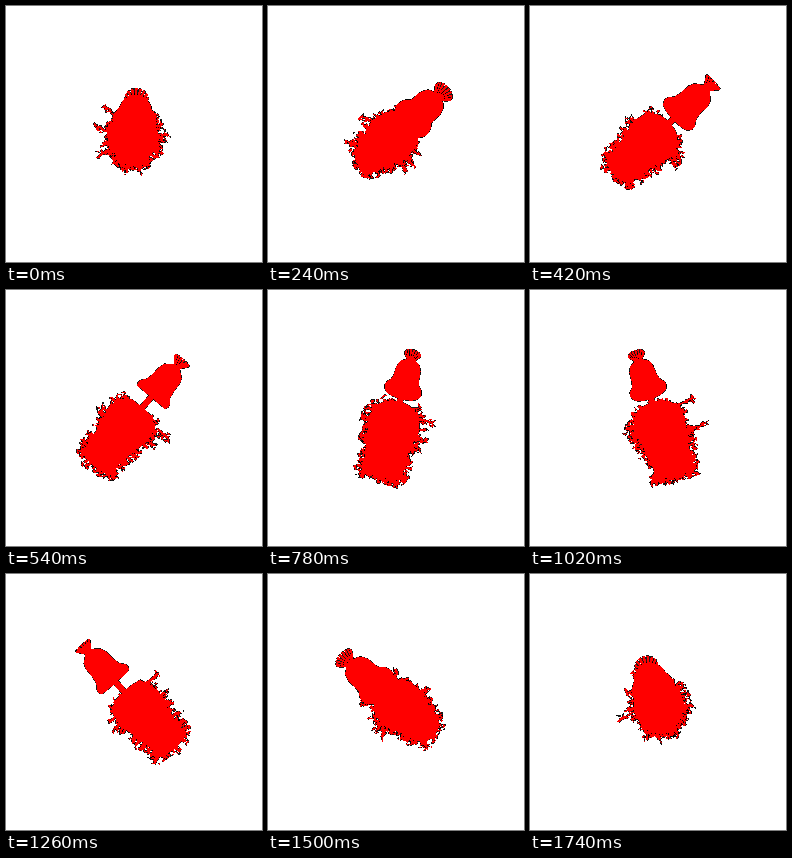
These frames come from a looping animation (256x256 px, 1800 ms). An HTML page:

```html
<!DOCTYPE html>
<html lang="en">
<head>
<meta charset="utf-8">
<title>Turning bell</title>
<style>
html, body { margin: 0; width: 100%; height: 100%; overflow: hidden; background: #fff; }
svg { display: block; width: 100vw; height: 100vh; }
</style>
</head>
<body>
<svg viewBox="0 0 256 256" shape-rendering="crispEdges">
  <path id="edge" fill="#000" stroke="#000" stroke-width="0.9"/>
  <path id="body" fill="#f00"/>
</svg>
<script>
const LOOP = 1800, STEPS = 30, TAU = Math.PI * 2;
const TILT = 0.756, PITCH = 0.45, PHASE = 0.045, CAMERA = 265;
const [sinT, cosT, sinP, cosP] = [Math.sin(TILT), Math.cos(TILT), Math.sin(PITCH), Math.cos(PITCH)];

let seed = 71;
const random = () => (seed = (seed * 16807) % 2147483647) / 2147483647;
const spread = size => (random() * 2 - 1) * size;

// Model space: u along the tilted axis, v and w across it.
const polar = (u, r, a) => [u, r * Math.cos(a), r * Math.sin(a)];
const ring = (u, r, n = 28) => Array.from({ length: n }, (_, i) => polar(u, r, i * TAU / n));
const lathe = profile => profile.slice(1).map(([u, r], i) => [...ring(...profile[i]), ...ring(u, r)]);

const BELL = [[66, 3.5], [64, 6], [60, 11], [55, 13], [45, 13.5], [38, 15], [33, 19], [30, 19.5], [27, 18]];
const CORE = [[13, 14], [6, 23], [-8, 26], [-25, 22], [-45, 19], [-58, 18]];
const STEM = [[28, 3], [12, 3]];

function coreRadius(u) {
  const i = CORE.findIndex(([end]) => u >= end);
  const [u0, r0] = CORE[i - 1], [u1, r1] = CORE[i];
  return r1 + (r0 - r1) * (u - u1) / (u0 - u1);
}

const jitter = (p, size) => p.map(c => c + spread(size));
const cluster = (p, size) => Array.from({ length: 4 }, () => jitter(p, size));

// A twig is a slim stalk with a few angular leaves near its tip.
function twig(tip, base, leaves = 4) {
  const parts = [[...cluster(base, 2), ...cluster(tip, 1.4)]];
  for (let i = 0; i < leaves; i++) parts.push(cluster(jitter(tip, 3.2), 2.3));
  return parts;
}

const petals = Array.from({ length: 16 }, (_, i) => {
  const a = i * TAU / 16;
  return [polar(65, 3, a - 0.2), polar(65, 3, a + 0.2),
    polar(74, 8.6, a - 0.13), polar(74, 8.6, a + 0.13), polar(73, 9.2, a)];
});

const shapes = [...lathe(BELL), ...lathe(CORE), ...lathe(STEM), ...petals];

for (let i = 0; i < 135; i++) {
  const u = 11 - 68 * random(), a = i * 2.39996, r = coreRadius(u);
  shapes.push(...twig(polar(u, r + 1 + random() * 6, a), polar(u, r - 4, a)));
}
for (let i = 0; i < 26; i++) {
  const a = i * 2.39996, r = 22 * Math.sqrt(random());
  shapes.push(...twig(polar(-58 - random() * 4, r, a), polar(-53, r * 0.8, a)));
}

const ARMS = [[-22, 17, -37], [-62, 10, 15], [-60, -17, 20], [-58, -15, -20],
  [8, -24, -32], [-5, 0, 35], [4, 29, -28], [-10, -36, -8], [-10, -35, 5]];
for (const [u, v, w] of ARMS) {
  const base = [u * 0.9, v * 0.65, w * 0.65];
  const middle = [u * 0.95, v * 0.85, w * 0.85];
  shapes.push(...twig(middle, base, 3), ...twig([u, v, w], middle, 4));
}

function project([u, v, w], sin, cos) {
  const out = u * sinT - v * cosT, up = u * cosT + v * sinT;
  const x = out * sin + w * cos, z = out * cos - w * sin;
  const scale = CAMERA / (CAMERA - z * cosP - up * sinP);
  return [127.5 + x * scale, 128 + (z * sinP - up * cosP) * scale];
}

// Convex hull, always wound the same way so that overlaps stay filled.
function hull(points) {
  points.sort((a, b) => a[0] - b[0] || a[1] - b[1]);
  const chain = list => {
    const h = [];
    for (const p of list) {
      while (h.length > 1) {
        const a = h.at(-2), b = h.at(-1);
        if ((b[0] - a[0]) * (p[1] - a[1]) - (b[1] - a[1]) * (p[0] - a[0]) > 0) break;
        h.pop();
      }
      h.push(p);
    }
    h.pop();
    return h;
  };
  return [...chain(points), ...chain([...points].reverse())];
}

const outline = points => 'M' + points.map(p => p.map(c => c.toFixed(2)).join(' ')).join('L') + 'Z';
const edge = document.getElementById('edge'), body = document.getElementById('body');
let shown = -1;

function draw(time) {
  const step = Math.floor(time % LOOP / LOOP * STEPS);
  if (step !== shown) {
    shown = step;
    const angle = step / STEPS * TAU + PHASE, sin = Math.sin(angle), cos = Math.cos(angle);
    const d = shapes.map(s => outline(hull(s.map(p => project(p, sin, cos))))).join('');
    edge.setAttribute('d', d);
    body.setAttribute('d', d);
  }
}

const start = performance.now();
function tick() {
  draw(performance.now() - start);
  requestAnimationFrame(tick);
}
tick();
</script>
</body>
</html>
```
